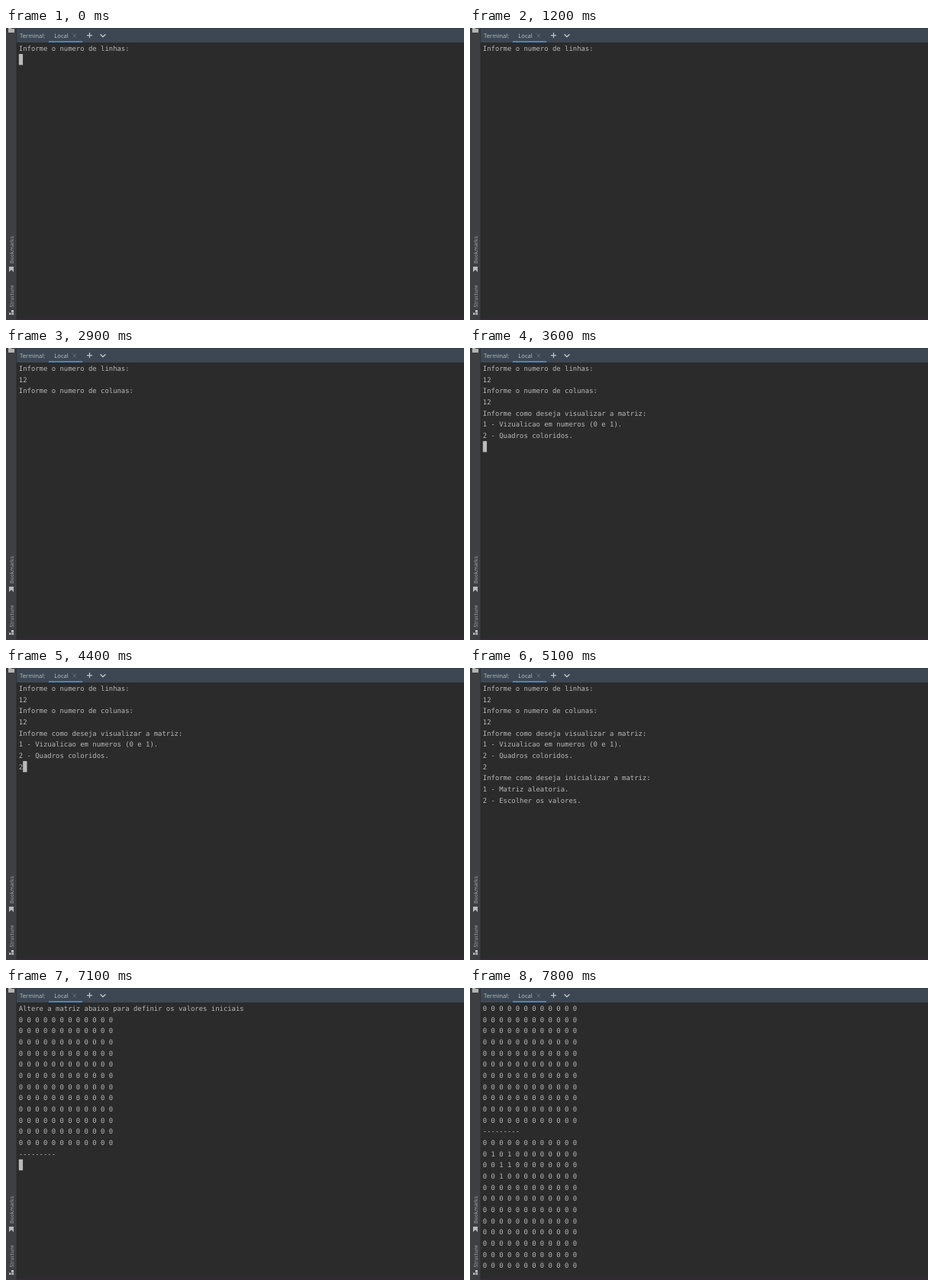
Write an HTML page with a canvas that moves like this. It is 600 px wide and 383 px high and loops after 8000 ms.

```html
<!DOCTYPE html>
<html lang="pt">
<head>
<meta charset="utf-8">
<title>Terminal</title>
<style>
html, body { margin: 0; width: 100%; height: 100%; overflow: hidden; background: #2b2b2b; }
canvas { display: block; }
</style>
</head>
<body>
<canvas id="stage" width="600" height="383"></canvas>
<script>
const ctx = document.getElementById('stage').getContext('2d');
const LOOP = 8000, BLINK = 500;
const LEFT = 16.8, CHAR = 5.37, LINE = 14.67, BASE = 30, VISIBLE = 24;
const MONO = '8.92px "DejaVu Sans Mono", monospace';
const UI = '"Open Sans", "Noto Sans", sans-serif';

const askRows = ['Informe o numero de linhas:'];
const askCols = [...askRows, '12', 'Informe o numero de colunas:'];
const askView = [...askCols, '12', 'Informe como deseja visualizar a matriz:',
  '1 - Vizualicao em numeros (0 e 1).', '2 - Quadros coloridos.'];
const askInit = [...askView, '2', 'Informe como deseja inicializar a matriz:',
  '1 - Matriz aleatoria.', '2 - Escolher os valores.'];

const matrix = (live = []) => Array.from({ length: 12 }, (_, r) =>
  Array.from({ length: 12 }, (_, c) => live.includes(r + ',' + c) ? 1 : 0).join(' '));
const editor = ['Altere a matriz abaixo para definir os valores iniciais', ...matrix(), '---------'];
const edited = matrix(['1,1', '1,3', '2,2', '2,3', '3,2']);

// The cursor sits at the end of the last line; blinking restarts at blinkFrom.
const step = (at, lines, blinkFrom = at) => ({ at, lines, blinkFrom });
const steps = [
  step(0, [...askRows, ''], -300),
  step(1600, [...askRows, '1']),
  step(1800, [...askRows, '12'], 1900),
  step(2400, [...askCols, '']),
  step(3100, [...askCols, '1']),
  step(3300, [...askCols, '12']),
  step(3600, [...askView, '']),
  step(4400, [...askView, '2']),
  step(4600, [...askInit, '']),
  step(5700, [...askInit, '2']),
  step(6000, [...editor, '']),
  step(7300, [...editor, ...edited])
];

function rect(color, x, y, w, h) {
  ctx.fillStyle = color;
  ctx.fillRect(x, y, w, h);
}

function line(color, width, ...points) {
  ctx.strokeStyle = color;
  ctx.lineWidth = width;
  ctx.beginPath();
  points.forEach(([x, y]) => ctx.lineTo(x, y));
  ctx.stroke();
}

function text(str, x, y, font, color) {
  ctx.font = font;
  ctx.fillStyle = color;
  ctx.fillText(str, x, y);
}

function sideLabel(str, bottom) {
  ctx.save();
  ctx.translate(9.5, bottom);
  ctx.rotate(-Math.PI / 2);
  text(str, 0, 0, '6.8px ' + UI, '#a9abac');
  ctx.restore();
}

function drawFrame() {
  rect('#2b2b2b', 0, 0, 600, 383);
  rect('#2f2c30', 14, 380, 586, 3);

  rect('#3d4754', 14, 0, 586, 19);
  rect('#343a42', 14, 0, 586, 1);
  text('Terminal:', 18, 13, '7.7px ' + UI, '#bcc0c4');
  text('Local', 63.3, 13, '7.7px ' + UI, '#bcc0c4');
  rect('#4a86c0', 56, 17, 44, 2);
  line('#69727c', 0.9, [87.5, 8], [92, 12.5]);
  line('#69727c', 0.9, [92, 8], [87.5, 12.5]);
  line('#c3c7ca', 1.2, [106, 9.7], [113, 9.7]);
  line('#c3c7ca', 1.2, [109.5, 6.2], [109.5, 13.2]);
  line('#c3c7ca', 1.3, [123.5, 8.2], [127, 11.5], [130.5, 8.2]);

  rect('#3d3f41', 0, 0, 13, 383);
  rect('#323436', 13, 0, 1, 383);
  rect('#b2b4b5', 3, 0, 4, 2);
  rect('#b2b4b5', 3, 1, 8, 5);

  sideLabel('Bookmarks', 309);
  ctx.fillStyle = '#b8babb';
  ctx.beginPath();
  [[4, 313], [10, 313], [10, 320], [7, 317.3], [4, 320]].forEach(([x, y]) => ctx.lineTo(x, y));
  ctx.fill();

  sideLabel('Structure', 366.5);
  rect('#b8babb', 7, 370, 3, 3);
  rect('#b8babb', 4, 373.5, 2.7, 2.7);
  rect('#b8babb', 7.5, 373.5, 2.7, 2.7);
}

function draw(t) {
  const { lines, blinkFrom } = steps.findLast(s => s.at <= t);
  const shown = lines.slice(-VISIBLE);
  const last = shown.length - 1;

  drawFrame();
  shown.forEach((str, row) => text(str, LEFT, BASE + row * LINE, MONO, '#b7b7b7'));

  const cursorOn = Math.floor(Math.max(0, t - blinkFrom) / BLINK) % 2 === 0;
  if (cursorOn) {
    rect('#bbbbbb', LEFT + shown[last].length * CHAR, 19.4 + last * LINE, 5.3, 14.4);
  }
}

ctx.textRendering = 'geometricPrecision';
const start = performance.now();
function tick() {
  draw((performance.now() - start) % LOOP);
  requestAnimationFrame(tick);
}
tick();
</script>
</body>
</html>
```
